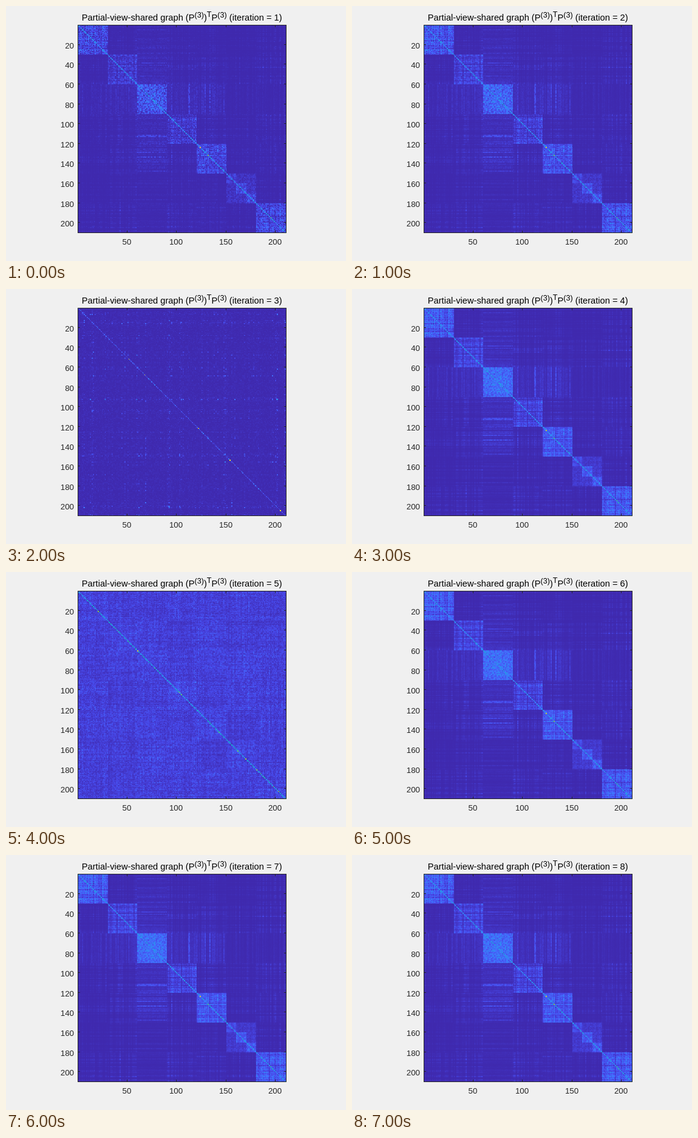
An HTML page with a canvas for the animation above (8 s loop, 560 by 420 pixels).

```html
<!DOCTYPE html>
<html lang="en">
<head>
<meta charset="utf-8">
<title>Shared graph</title>
<style>
html, body { margin: 0; width: 560px; height: 420px; overflow: hidden; background: #f0f0f0; }
canvas, svg { position: absolute; left: 0; top: 0; }
text { font-family: "Liberation Sans", Arial, sans-serif; font-size: 13.33px; fill: #262626; }
.title { font-size: 14.67px; fill: #000; }
.title .sup { font-size: 12.6px; }
</style>
</head>
<body>
<canvas id="stage" width="560" height="420"></canvas>
<svg width="560" height="420" viewBox="0 0 560 420">
  <text class="title" x="289.7" y="24" text-anchor="middle">Partial-view-shared graph (P<tspan class="sup" dy="-5">(3)</tspan><tspan dy="5">)</tspan><tspan class="sup" dy="-6">T</tspan><tspan dy="6">P</tspan><tspan class="sup" dy="-5">(3)</tspan><tspan dy="5"> (iteration = </tspan><tspan id="count">1</tspan>)</text>
  <rect x="118.5" y="31.5" width="343" height="342" fill="none" stroke="#262626"/>
  <g id="axes"></g>
</svg>
<script>
const N = 210, GROUP = 30, LEFT = 118.65, TOP = 31.5, SIZE = 342.3;
const STEP = 1000, ITERATIONS = 8;
const COMPACT = 2; // the one class whose members are all alike

const stops = ["3e26a8", "4747e7", "4270fe", "2796eb", "12b6c8", "47cb86", "abc739", "fec338", "f9fb15"]
  .map(hex => [0, 2, 4].map(k => parseInt(hex.slice(k, k + 2), 16)));

function rand(a, b, seed) {
  let n = Math.imul(a + 1, 374761393) ^ Math.imul(b + 1, 668265263) ^ Math.imul(seed + 1, 974634777);
  n = Math.imul(n ^ (n >>> 13), 1274126177);
  n = Math.imul(n ^ (n >>> 16), 2146121005);
  return ((n ^ (n >>> 15)) >>> 0) / 4294967296;
}

const classOf = i => Math.floor(i / GROUP);
const isLoose = c => c % 2 === 1;

// How strongly a member ties to its own class
function own(i) {
  const h = rand(i, 3, 7), c = classOf(i);
  if (c === COMPACT) return .78 + .22 * Math.sqrt(h);
  if (c === 5) return .6 + .4 * h;
  return isLoose(c) ? .25 + .75 * h : .4 + .62 * Math.sqrt(h);
}

// How strongly a member ties to another class: few members do
function link(i, c) {
  if (classOf(i) === COMPACT) return .75 + .25 * rand(i, c, 8);
  const h = .55 * rand(i, 5, 9) + .45 * rand(i, c, 10);
  return .1 + 1.1 * h ** 2.4;
}

const reach = c => .5 + .5 * Math.abs(Math.sin(Math.PI * c / 5));

function bond(a, b) {
  if (a === COMPACT && b > 4) return .03;
  return .2 * reach(a) * reach(b) * (a === COMPACT || b === COMPACT ? .75 : 1);
}

function blockValue(i, j, n) {
  const a = classOf(i), b = classOf(j), early = Math.exp(1 - n);
  if (i === j) {
    const spike = a === 6 || a === 4 ? .5 * rand(i, 1, 2) ** 9 : 0;
    return .24 + .13 * rand(i, n, 5) + .07 * own(i) + spike;
  }
  const noise = 1 + (.75 + early) * (rand(i, j, 11) - .5);
  let v;
  if (a === b) {
    v = (isLoose(a) ? .2 : .24) * own(i) * own(j);
    if (a === 5 && Math.floor(i / 10) !== Math.floor(j / 10)) v *= .45;
  } else {
    v = bond(a, b) * link(i, b) * link(j, a);
  }
  return .01 + v * noise * (1.06 - .36 * early);
}

const peaks = [51, 67, 121, 153, 204];

function sparseValue(i, j) {
  if (i === j) return peaks.includes(i) ? .96 : .07 + .22 * rand(i, i, 21) ** 2;
  const tail = k => rand(k, 9, 23) ** 6;
  const dot = rand(i, j, 25) ** 5;
  return .012 + .025 * rand(i, j, 27) ** 3 + .4 * tail(i) * tail(j) * dot + .05 * (tail(i) + tail(j)) * dot;
}

function noiseValue(i, j) {
  if (i === j) return .36 + .14 * rand(i, i, 32) + .35 * rand(i, i, 31) ** 14;
  const a = classOf(i), b = classOf(j);
  const row = (k, c) => .6 + .35 * rand(k, 4, 33) + .45 * rand(k, c, 34);
  const tie = a === b ? 1.2 : .85 + .3 * rand(a, b, 35);
  return .015 + .078 * row(i, b) * row(j, a) * tie * (.4 + 1.2 * rand(i, j, 37));
}

const ruleFor = n => n === 3 ? sparseValue : n === 5 ? noiseValue : blockValue;

function colour(v) {
  const p = Math.min(.9999, Math.max(0, v)) * (stops.length - 1);
  const k = Math.floor(p);
  return stops[k].map((c, m) => c + (stops[k + 1][m] - c) * (p - k));
}

function paint(n) {
  const tile = document.createElement("canvas");
  tile.width = tile.height = N;
  const g = tile.getContext("2d");
  const image = g.createImageData(N, N);
  const value = ruleFor(n);
  for (let i = 0; i < N; i++) {
    for (let j = i; j < N; j++) {
      const rgba = [...colour(value(i, j, n)), 255];
      image.data.set(rgba, (i * N + j) * 4);
      image.data.set(rgba, (j * N + i) * 4);
    }
  }
  g.putImageData(image, 0, 0);
  return tile;
}

const axes = document.getElementById("axes");
function add(tag, attrs, label = "") {
  const el = document.createElementNS("http://www.w3.org/2000/svg", tag);
  for (const key in attrs) el.setAttribute(key, attrs[key]);
  el.textContent = label;
  axes.append(el);
}
const tick = d => add("path", { d, stroke: "#262626", fill: "none" });
const place = n => (n - .5) / N * SIZE;

for (let n = 50; n <= 200; n += 50) {
  const x = Math.floor(LEFT + place(n)) + .5;
  tick(`M${x} 373v-3M${x} 32v3`);
  add("text", { x: x - .5, y: 393, "text-anchor": "middle" }, n);
}
for (let n = 20; n <= 200; n += 20) {
  const y = Math.floor(TOP + place(n)) + .5;
  tick(`M119 ${y}h3M461 ${y}h-3`);
  add("text", { x: 112, y: y + 6, "text-anchor": "end" }, n);
}

const ctx = document.getElementById("stage").getContext("2d");
const count = document.getElementById("count");
const tiles = Array.from({ length: ITERATIONS }, (_, k) => paint(k + 1));
ctx.imageSmoothingEnabled = false;
let shown = -1;

function draw() {
  const k = Math.floor(performance.now() / STEP) % ITERATIONS;
  if (k !== shown) {
    ctx.clearRect(0, 0, 560, 420);
    ctx.drawImage(tiles[k], LEFT, TOP, SIZE, SIZE);
    count.textContent = k + 1;
    shown = k;
  }
  requestAnimationFrame(draw);
}
draw();
</script>
</body>
</html>
```
